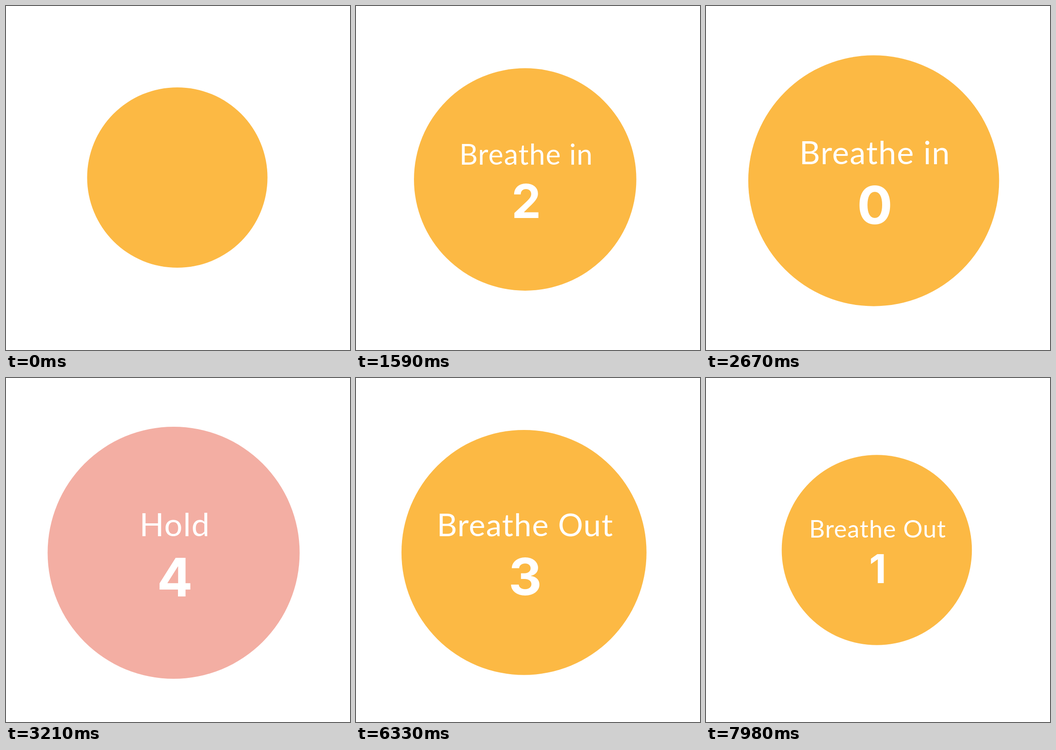
Recreate the animation shown at these times as an HTML page with a canvas. Size 748 px wide and 748 px high, loop 8000 ms.

```html
<!DOCTYPE html>
<html lang="en">
<head>
<meta charset="utf-8">
<title>Breathing exercise</title>
<style>
  html, body { margin: 0; width: 100%; height: 100%; overflow: hidden; background: #fff; }
  canvas { display: block; width: 100vw; height: 100vh; }
</style>
</head>
<body>
<canvas id="stage"></canvas>
<script>
const SIZE = 748, LOOP = 8000, STEP = 30;
const R_MIN = 196, R_MAX = 274;
const ORANGE = [252, 185, 68], PINK = [238, 169, 211];
const PHASES = [
  { start: 30, label: 'Breathe in' },
  { start: 2700, label: 'Hold' },
  { start: 5430, label: 'Breathe Out' }
];

const canvas = document.getElementById('stage');
const ctx = canvas.getContext('2d');

const mix = (a, b, k) => a + (b - a) * k;
const ramp = (t, from, to) => Math.min(1, Math.max(0, (t - from) / (to - from)));
const sine = k => (1 - Math.cos(Math.PI * k)) / 2;
const smooth = k => k * k * (3 - 2 * k);

// 0 = fully exhaled, 1 = fully inhaled
const breath = t => sine(ramp(t, -60, 2910)) - sine(ramp(t, 5730, 8700));
const tint = t => smooth(ramp(t, 2880, 3420)) - smooth(ramp(t, 5400, 5940));

// The first count lasts a little longer than the others
const count = age => age < 690 ? 4 : Math.max(0, 3 - Math.floor((age - 690) / 630));

function write(text, font, spacing, y) {
  ctx.font = font;
  ctx.letterSpacing = spacing;
  ctx.fillText(text, 2.6, y);
}

function draw(t) {
  const ratio = canvas.width / SIZE;
  ctx.setTransform(ratio, 0, 0, ratio, 0, 0);
  ctx.fillStyle = '#fff';
  ctx.fillRect(0, 0, SIZE, SIZE);

  const b = breath(t), k = tint(t);
  const scale = mix(R_MIN, R_MAX, b) / R_MAX;
  ctx.translate(mix(372.5, 364.5, b), mix(373, 380, b));
  ctx.scale(scale, scale);

  ctx.fillStyle = `rgb(${ORANGE.map((c, i) => Math.round(mix(c, PINK[i], k))).join()})`;
  ctx.beginPath();
  ctx.arc(0, 0, R_MAX, 0, Math.PI * 2);
  ctx.fill();

  const phase = PHASES.filter(p => t >= p.start).pop();
  if (!phase) return;
  ctx.fillStyle = '#fff';
  ctx.textAlign = 'center';
  ctx.textBaseline = 'alphabetic';
  write(phase.label, '400 70px Lato, sans-serif', '1.5px', -36);
  write(count(t - phase.start), '700 115px Inter, sans-serif', '0px', 95);
}

function fit() {
  const side = Math.min(innerWidth, innerHeight) || SIZE;
  canvas.width = canvas.height = Math.round(side * (window.devicePixelRatio || 1));
}

const begin = performance.now();
function tick() {
  const t = (performance.now() - begin) % LOOP;
  draw(Math.floor(t / STEP) * STEP);
  requestAnimationFrame(tick);
}

addEventListener('resize', fit);
fit();
tick();
</script>
</body>
</html>
```
